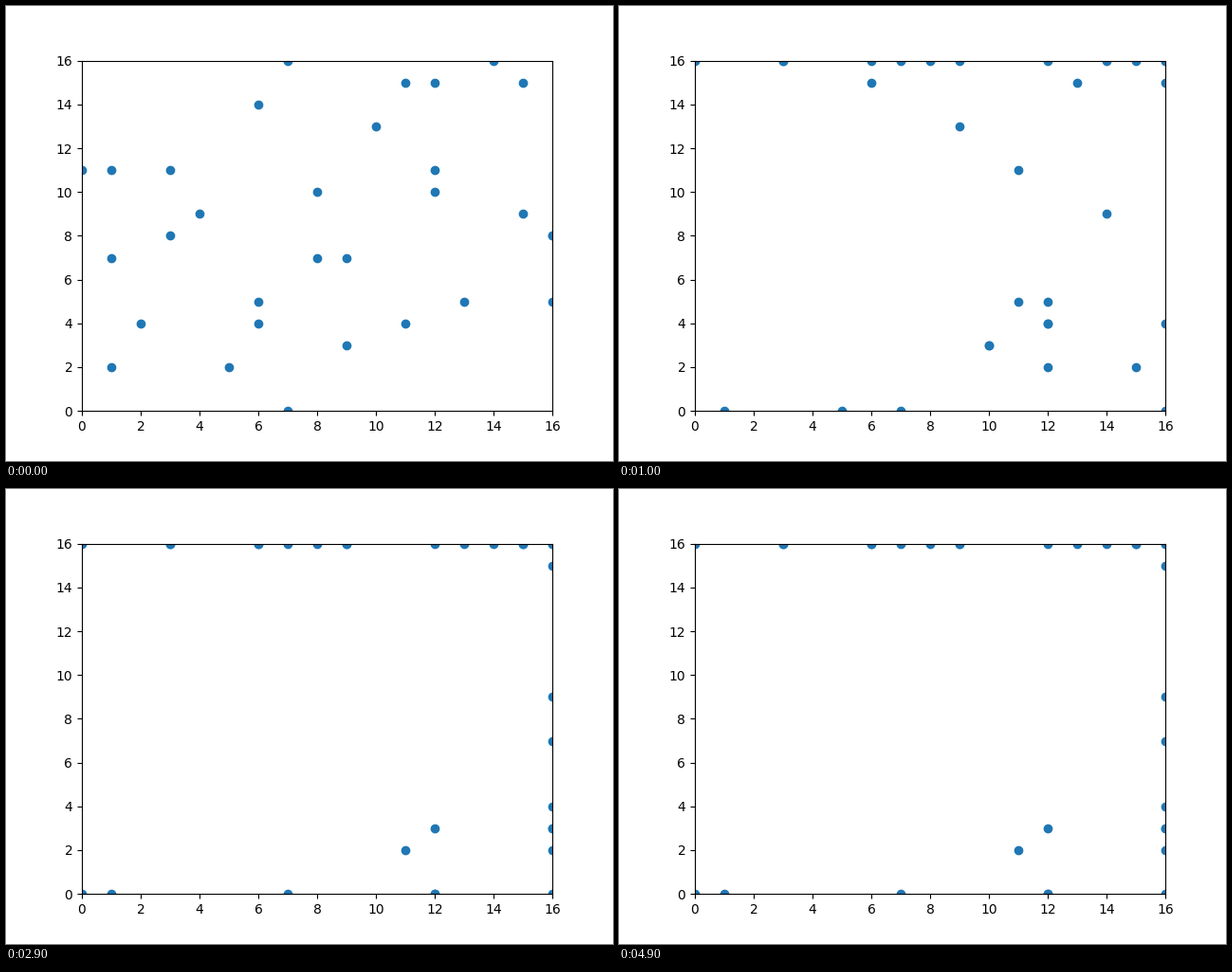
A matplotlib script for the animation above (5 s loop, 640 by 480 pixels).

```python
import matplotlib.pyplot as plt
from matplotlib.animation import FuncAnimation

SIZE = 16
FRAMES = 50
STEP = {"U": (0, 1), "D": (0, -1), "L": (-1, 0), "R": (1, 0)}

paths = []


def clamp(value):
    return min(max(value, 0), SIZE)


def send(x, y, heading, turn=FRAMES, then=""):
    """Walk straight; from step `turn` on repeat the moves `then` until a wall stops them."""
    path, halted = [], False
    for step in range(FRAMES):
        path.append((x, y))
        turned = step >= turn
        dx, dy = STEP[then[(step - turn) % len(then)] if turned else heading]
        if not halted:
            x, y = clamp(x + dx), clamp(y + dy)
            hit_wall = (x if dx else y) in (0, SIZE)
            halted = turned and hit_wall
    paths.append(path)


def rise(x, *rows):
    for y in rows:
        send(x, y, "U")


# Straight up, column by column
rise(0, 11)
rise(3, 8, 11)
rise(6, 5, 14)
rise(7, SIZE)
rise(8, 7)
rise(9, 3, 7)
rise(12, 11)
rise(13, 5)
rise(14, SIZE)
rise(15, 9)
rise(SIZE, 8, 8)

# Straight down
send(1, 7, "D")
send(7, 0, "D")
send(12, 15, "D")
send(SIZE, 5, "D")

# Straight to the right
send(4, 9, "R")
send(5, 2, "R")
send(6, 4, "R")
send(15, 15, "R")

# One turn
send(1, 2, "U", turn=1, then="R")
send(8, 10, "R", turn=4, then="D")
send(10, 13, "D", turn=10, then="R")
send(11, 4, "D", turn=4, then="L")

# Staircases up to the right
send(1, 11, "R", turn=10, then="UR")
send(2, 4, "R", turn=11, then="UR")

# Falling, then hopping on the spot for good
send(11, 15, "D", turn=14, then="UD")
send(12, 10, "D", turn=8, then="UD")

fig, ax = plt.subplots(figsize=(6.4, 4.8), dpi=100)
ax.set(xlim=(0, SIZE), ylim=(0, SIZE))
dots, = ax.plot([], [], "o", color="#1f77b4")


def update(frame):
    dots.set_data(*zip(*(path[frame] for path in paths)))
    return dots,


anim = FuncAnimation(fig, update, frames=FRAMES, interval=100, repeat=True, repeat_delay=0)
plt.show()
```
